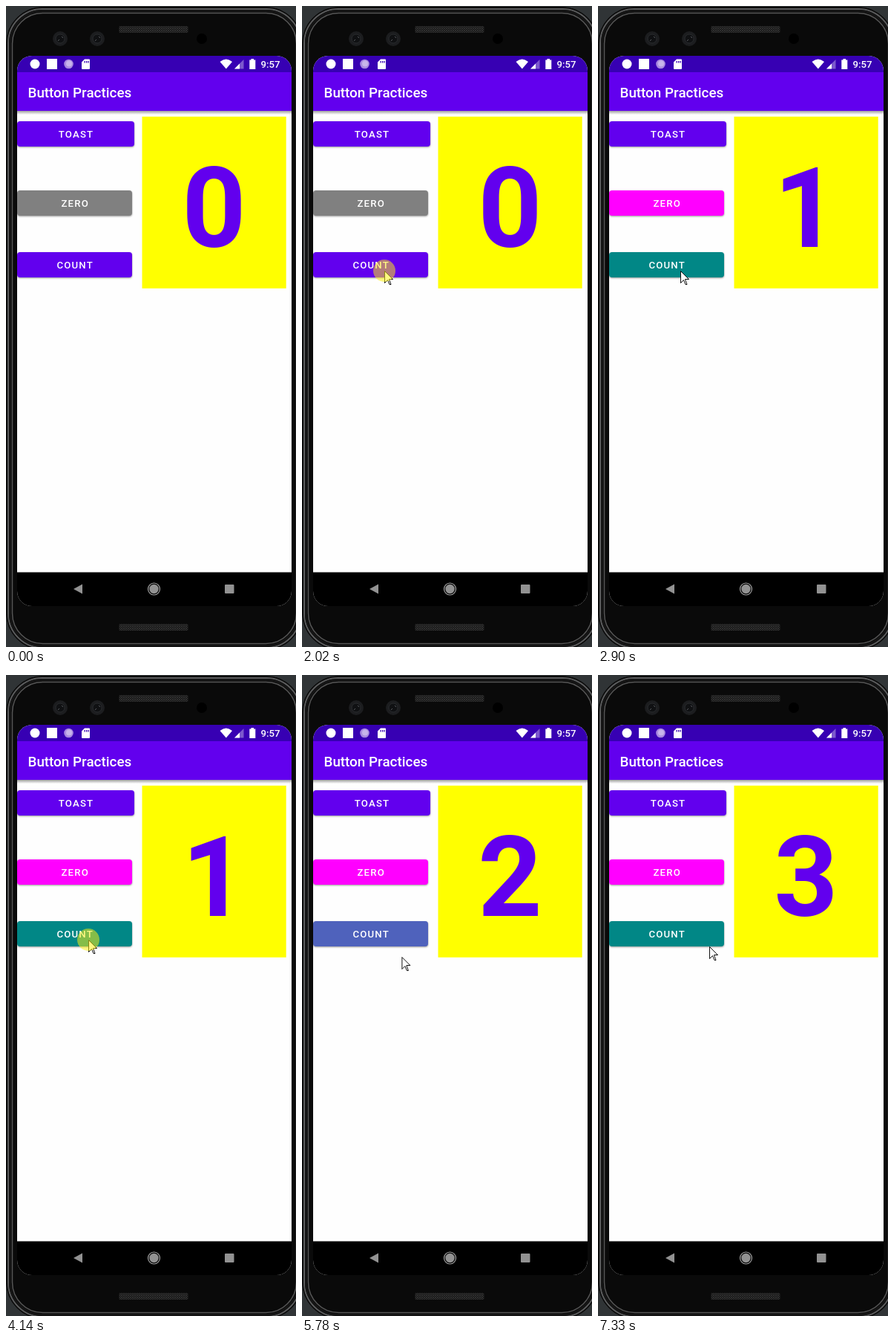
An HTML page for the animation above (8000 ms loop, 391x862 px).

```html
<!DOCTYPE html>
<html lang="en">
<head>
<meta charset="utf-8">
<title>Counter app</title>
<style>
  html, body { margin: 0; width: 100%; height: 100%; overflow: hidden; background: #303436; }
  svg { display: block; }
  text { font-family: Roboto, sans-serif; font-weight: 500; fill: #fff; }
  .label { font-size: 13.2px; letter-spacing: 1.18px; text-anchor: middle; }
  .raised { filter: drop-shadow(0 1px 1px rgba(0, 0, 0, .4)); }
</style>
</head>
<body>
<svg width="391" height="862" viewBox="0 0 391 862">
  <defs>
    <pattern id="mesh" width="3" height="3" patternUnits="userSpaceOnUse">
      <path d="M0 0L3 3M3 0L0 3" stroke="#353535" stroke-width=".8"/>
    </pattern>
    <linearGradient id="barShadow" x2="0" y2="1">
      <stop stop-color="#000" stop-opacity=".38"/>
      <stop offset="1" stop-color="#000" stop-opacity="0"/>
    </linearGradient>
    <clipPath id="screen"><rect x="15" y="67" width="370" height="740" rx="20"/></clipPath>
    <clipPath id="countShape"><rect x="15" y="331" width="155" height="34" rx="4"/></clipPath>
    <g id="lens">
      <circle r="10" fill="#1c1d1f"/>
      <circle r="6" fill="#101113" stroke="#292b2e"/>
      <path d="M-3 3L-1 1M2 -3L4 -1" stroke="#55585c"/>
    </g>
  </defs>

  <!-- Phone body, running off the right and bottom edges -->
  <g fill="none">
    <rect x=".5" y="1.5" width="399" height="864" rx="49" fill="#080808" stroke="#0c0c0c"/>
    <rect x="3" y="4" width="394" height="859" rx="46" stroke="#5c5d5e" stroke-width="2"/>
    <rect x="5.500" y="6.500" width="389" height="854" rx="44" stroke="#151515" stroke-width="3"/>
    <rect x="8.500" y="9.500" width="383" height="848" rx="41" fill="#0a0a0a" stroke="#565656" stroke-width="1.500"/>
  </g>
  <g fill="#171717">
    <rect x="152" y="27" width="94" height="9" rx="2"/>
    <rect x="152" y="831" width="94" height="9" rx="2"/>
  </g>
  <g fill="url(#mesh)">
    <rect x="153" y="27" width="92" height="9"/>
    <rect x="153" y="831" width="92" height="9"/>
  </g>
  <use href="#lens" x="73" y="44"/>
  <use href="#lens" x="123" y="44"/>
  <circle cx="264" cy="44" r="7" fill="#000"/>

  <!-- Screen -->
  <g clip-path="url(#screen)">
    <path d="M15 67h370v740h-370z" fill="#fefefe"/>
    <path d="M15 67h370v22h-370z" fill="#3700b3"/>
    <path d="M15 89h370v52h-370z" fill="#6200ee"/>
    <path d="M15 141h370v5h-370z" fill="url(#barShadow)"/>
    <path d="M15 761.500h370v46h-370z" fill="#000"/>
  </g>

  <!-- Status bar -->
  <g fill="#fff">
    <circle cx="39" cy="78" r="6.5"/>
    <rect x="55" y="71" width="14" height="14"/>
    <circle cx="84.5" cy="78" r="6.3" fill="#a98be0"/>
    <circle cx="85" cy="77.5" r="4" fill="#c7b5ea"/>
    <path fill-rule="evenodd" d="M106 71.5h6q1 0 1 1v11.500q0 1-1 1h-9q-1 0-1-1v-8.500zM105.500 74v2.500h1.300v-2.500zM108 74v2.500h1.300v-2.500zM110.400 74v2.500h1.300v-2.500z"/>
    <path d="M288.500 75Q296.800 68 305 75L296.800 84.500Z"/>
    <path d="M320.500 72v12.500h-12.500z" opacity=".35"/>
    <path d="M315 77.500v7h-7z"/>
    <path d="M330.500 71h3.500v1.500h2.300v12.500h-8v-12.500h2.200z"/>
  </g>
  <text x="343.500" y="83" font-size="13.2">9:57</text>
  <text x="29.500" y="123" font-size="18.83">Button Practices</text>

  <!-- Navigation bar -->
  <g fill="#929292">
    <path d="M91 784L103 777.500V790.500Z"/>
    <circle cx="199.500" cy="784" r="6.200"/>
    <circle cx="199.500" cy="784" r="8" fill="none" stroke="#a0a0a0" stroke-width="1.200"/>
    <rect x="295" y="778" width="12.500" height="12" rx="1"/>
  </g>

  <!-- Content -->
  <path d="M183.500 148.700h194.200v231h-194.200z" fill="#ff0"/>
  <text id="number" x="280.500" y="324" font-size="150.600" text-anchor="middle" style="font-weight:700;fill:#6200ee">0</text>
  <rect class="raised" x="15" y="155" width="158" height="34" rx="4" fill="#6200ee"/>
  <rect class="raised" id="zero" x="15" y="248" width="155" height="34" rx="4"/>
  <rect id="count" x="15" y="331" width="155" height="34" rx="4"/>
  <g clip-path="url(#countShape)"><circle id="ripple" fill="#fff"/></g>
  <text class="label" x="94.500" y="177">TOAST</text>
  <text class="label" x="93.200" y="270">ZERO</text>
  <text class="label" x="93.200" y="353">COUNT</text>

  <path id="cursor" d="M.5 .5V16.500L4.500 12.500L7 18.500H9L6.500 11.500H11.500Z" fill="#fff" stroke="#111"/>
  <circle id="press" r="15" fill="#fff010" opacity=".52"/>
</svg>
<script>
const LOOP = 8000, STEP = 75;
const el = id => document.getElementById(id);
const set = (id, attrs) => {
  for (const name in attrs) el(id).setAttribute(name, attrs[name]);
};
const clamp = v => Math.max(0, Math.min(1, v));

const countColors = ['#6200ee', '#018786', '#465ab8', '#018786'];

// Pointer moves: start, end, number of steps, from, to
const moves = [
  [110, 610, 8, [335, 920], [111, 364]],
  [1160, 1260, 2, [111, 364], [111, 356]],
  [5220, 5370, 3, [111, 356], [111, 400]],
  [5540, 6090, 8, [111, 400], [150, 365]]
];

// rest: ripple opacity that stays once the click has settled
const clicks = [
  { down: 2020, up: 2190, end: 2900, rest: 0 },
  { down: 4140, up: 4290, end: 4760, rest: .05 },
  { down: 6490, up: 6640, end: 7330, rest: 0 }
];

function pointerAt(t) {
  const move = moves.filter(m => t >= m[0]).pop();
  if (!move) return null;
  const [start, end, steps, from, to] = move;
  const k = Math.floor((t - start) / (end - start) * (steps - 1) + 1e-6);
  const p = clamp((k + 1) / steps);
  const eased = p * (1.4 - .4 * p);
  return from.map((v, i) => v + (to[i] - v) * eased);
}

function rippleAt(t, pointer) {
  const click = clicks.filter(c => t >= c.up).pop();
  if (!click) return { lift: 0, cx: 0, cy: 0, r: 0, opacity: 0 };
  const span = click.end - click.up;
  const settled = t >= click.end;
  const age = settled ? span : Math.floor((t - click.up) / STEP) * STEP;
  const fade = clamp((age - 150) / (span - 150));
  // Once settled, the tint covers the button wherever the pointer goes.
  const [cx, cy] = settled ? [93, 348] : pointer;
  return {
    lift: 1 - clamp((age - 150) / 150),
    cx, cy,
    r: age && 30 + 110 * clamp(age / 300),
    opacity: .24 + (click.rest - .24) * fade
  };
}

function draw(t) {
  const pointer = pointerAt(t);
  const [x, y] = pointer || [0, 0];
  const held = clicks.some(c => t >= c.down && t < c.up);
  const place = `translate(${x} ${y})`;
  set('cursor', { transform: place, visibility: pointer ? 'visible' : 'hidden' });
  set('press', { transform: place, visibility: held ? 'visible' : 'hidden' });

  const value = clicks.filter(c => t >= c.up + STEP).length;
  el('number').textContent = value;
  set('zero', { fill: value ? '#f0f' : '#808080' });
  set('count', { fill: countColors[value] });

  const { lift, ...ripple } = rippleAt(t, pointer);
  set('ripple', ripple);
  el('count').style.filter =
    `drop-shadow(0 ${1 + 2 * lift}px ${1 + 2.5 * lift}px rgba(0,0,0,.4))`;
}

const began = performance.now();
function tick() {
  draw((performance.now() - began) % LOOP);
  requestAnimationFrame(tick);
}
tick();
</script>
</body>
</html>
```
